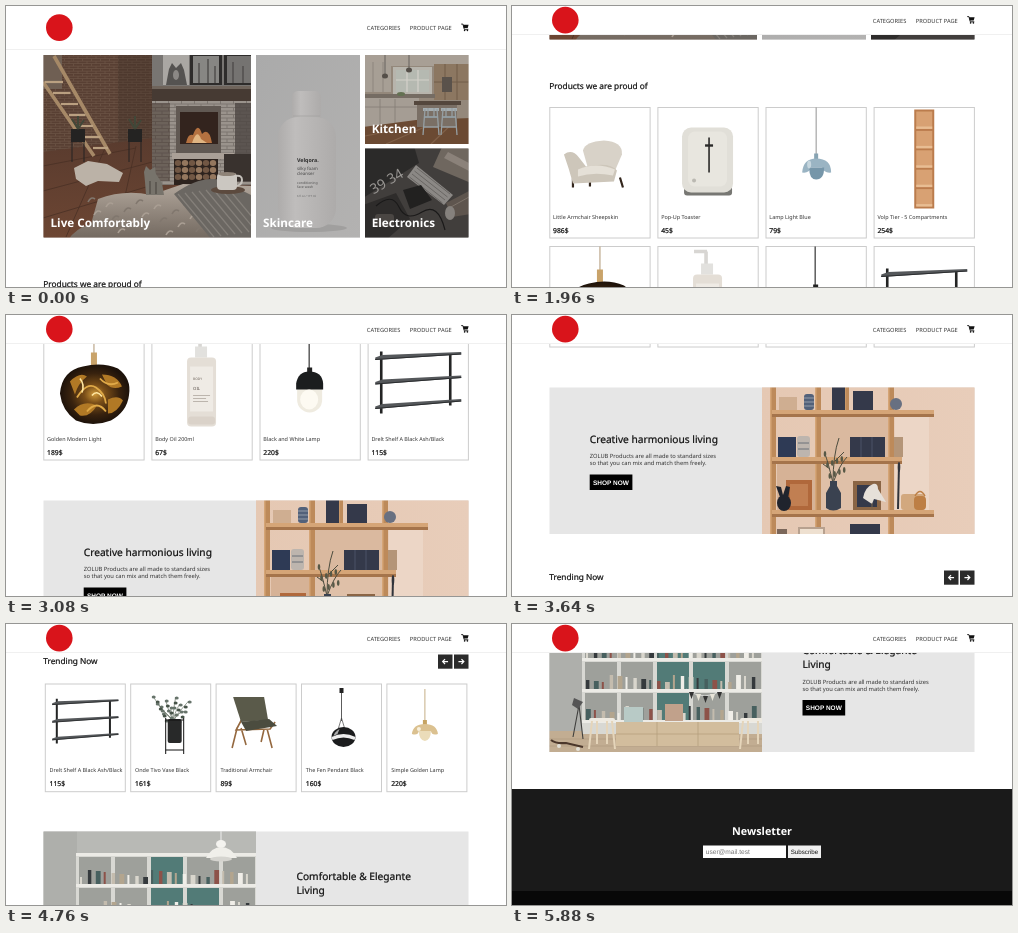
Write an HTML page that moves like this. It is 500 px wide and 281 px high and loops after 6020 ms.

```html
<!DOCTYPE html>
<html lang="en">
<head>
<meta charset="utf-8">
<title>Shop page scroll</title>
<style>
  html, body { margin: 0; width: 100%; height: 100%; overflow: hidden; background: #fff; }
  svg { display: block; }
  #stage { width: 100vw; height: 100vh; }
  text { font-family: "Noto Sans", "Open Sans", sans-serif; text-rendering: geometricPrecision; white-space: pre; }
  .ui { font-family: "Liberation Sans", Arial, sans-serif; }
  .medium { stroke: currentColor; stroke-width: .22; }
</style>
</head>
<body>
<svg id="stage" viewBox="0 0 500 281" preserveAspectRatio="none">
  <defs>
    <pattern id="brick" width="9" height="5" patternUnits="userSpaceOnUse">
      <rect width="9" height="5" fill="#6b5344"/>
      <path d="M.4 .4h8.2v1.8h-8.2zM-4.1 2.9h8.2v1.8h-8.2zM4.9 2.9h8.2v1.8h-8.2z" fill="#583f33"/>
    </pattern>
    <pattern id="stone" width="13" height="7" patternUnits="userSpaceOnUse">
      <rect width="13" height="7" fill="#7c756f"/>
      <path d="M.5 .5h12v2.5h-12zM-6 4h12v2.5h-12zM7 4h12v2.5h-12z" fill="#9a938c"/>
    </pattern>
    <linearGradient id="floor" x2="0" y2="1"><stop stop-color="#593b2e"/><stop offset="1" stop-color="#6d4633"/></linearGradient>
    <linearGradient id="fur" x2="0" y2="1"><stop stop-color="#b1a69b"/><stop offset="1" stop-color="#71675e"/></linearGradient>
    <linearGradient id="backdrop" x2="1" y2="1"><stop stop-color="#aaa"/><stop offset="1" stop-color="#b3b2b1"/></linearGradient>
    <linearGradient id="bottle"><stop stop-color="#aeacab"/><stop offset=".3" stop-color="#bfbdbc"/><stop offset="1" stop-color="#adabaa"/></linearGradient>
    <linearGradient id="plaster"><stop stop-color="#e5c8b3"/><stop offset="1" stop-color="#e8cdba"/></linearGradient>
    <radialGradient id="gold"><stop stop-color="#d09a3a"/><stop offset=".3" stop-color="#7a4e18"/><stop offset=".7" stop-color="#38220e"/><stop offset="1" stop-color="#1d120a"/></radialGradient>
    <filter id="soft"><feGaussianBlur stdDeviation=".55"/></filter>
  </defs>
  <g id="page"></g>
  <g id="header"></g>
</svg>
<script>
const rect = (x, y, w, h, fill, more = '') => `<rect x="${x}" y="${y}" width="${w}" height="${h}" fill="${fill}" ${more}/>`;
const oval = (x, y, rx, ry, fill) => `<ellipse cx="${x}" cy="${y}" rx="${rx}" ry="${ry}" fill="${fill}"/>`;
const shape = (d, fill) => `<path d="${d}" fill="${fill}"/>`;
const line = (d, stroke, width = 1) => `<path d="${d}" fill="none" stroke="${stroke}" stroke-width="${width}"/>`;
const text = (x, y, size, str, fill = '#111', more = '') =>
  `<text x="${x}" y="${y}" font-size="${size}" fill="${fill}" ${more}>${str}</text>`;
const shift = (x, y, body) => `<g transform="translate(${x} ${y})">${body}</g>`;
const photo = (x, y, w, h, base, body) =>
  `<svg x="${x}" y="${y}" width="${w}" height="${h}" viewBox="${x} ${y} ${w} ${h}">` +
  rect(x, y, w, h, base) + `<g filter="url(#soft)">${body}</g></svg>`;
const repeat = (n, fn) => Array.from({ length: n }, (_, i) => fn(i)).join('');
const medium = 'class="medium" color="#111"';
const bold = 'font-weight="700"';

// Hero photos
const livingRoom = photo(37.5, 49, 207.5, 182.5, '#5c453a',
  rect(36, 47, 110, 107, 'url(#brick)') +
  rect(36, 47, 20, 36, '#6f5f53') + rect(112, 47, 34, 90, '#3d2e27', 'opacity=".35"') +
  rect(146, 47, 101, 36, '#787572') +
  shape('M36 146L146 132L180 176V234H36Z', 'url(#floor)') +
  line('M37 160L130 142M37 185L150 155M37 212L160 175M60 231L100 140M110 231L130 140', '#4a3025', .8) +
  line('M48 50L104 148M37 76L88 150', '#a68967', 3.6) +
  repeat(7, i => line(`M${39 + i * 8} ${76 + i * 11}h${18 - i * .5}`, '#baa081', 2.2)) +
  rect(157, 47, 26, 32, '#aaa7a3') + shape('M160 79L163 63L166 57L170 62L175 57L178 64L181 79Z', '#555351') +
  oval(170, 69, 3, 5, '#8b8885') +
  rect(184, 47, 32, 32, '#2e2c2b') + rect(187, 50, 26, 27, '#878683') +
  rect(218, 47, 29, 32, '#2e2c2b') + rect(221, 50, 26, 27, '#757371') +
  line('M193 77V57M202 77V53M209 77V60M227 77V56M237 77V60', '#514f4d', 1.5) +
  rect(146, 80, 101, 17, '#463a33') + rect(146, 80, 101, 3, '#6f645b') +
  rect(146, 95, 101, 84, 'url(#stone)') + rect(146, 97, 18, 78, '#40322b', 'opacity=".5"') +
  rect(170, 100, 45, 47, '#615953') + rect(174, 106, 38, 32, '#33241e') +
  shape('M180 137Q182 127 187 129Q192 115 196 128Q203 121 206 137Z', '#b47140') +
  shape('M186 137Q191 122 195 133L201 137Z', '#e0b582') +
  rect(166, 147, 62, 6, '#aaa097') + rect(168, 153, 44, 26, '#2d231e') +
  repeat(18, i => oval(172 + i % 6 * 7, 157 + (i / 6 | 0) * 7, 3.2, 3, i % 2 ? '#94775e' : '#715744')) +
  rect(229, 97, 18, 79, '#4d4743', 'opacity=".8"') +
  rect(218, 148, 29, 27, '#39322e') +
  shape('M68 162L82 155L101 158L117 167L113 176L92 175L80 180L70 173Z', '#bbb2a7') +
  [72, 129].map(x => rect(x - 7, 123, 14, 13, '#242322') + line(`M${x - 6} 134v22M${x + 6} 134v22`, '#242322', 1) +
    line(`M${x} 123l-6 -10M${x} 123v-13M${x} 123l6 -9`, '#414738', 2)).join('') +
  shape('M92 193Q118 183 145 189L177 178L247 180V234H62Q70 222 85 218Z', 'url(#fur)') +
  repeat(26, i => line(`M${82 + i * 6} ${196 + i * 13 % 34}q3 -6 7 -3`, i % 2 ? '#a99e93' : '#81776e', 1.6)) +
  shape('M168 188Q194 169 215 174L247 190V234H206Z', '#6b6762') +
  repeat(8, i => line(`M${172 + i * 7} ${188 - i}l36 43`, '#85807a', 1.2)) +
  shape('M138 166l2 -6l4 4l5 -3l1 7l6 9l2 12h-18l-1 -13z', '#77736b') +
  line('M144 175v13M150 176v12', '#4f4a44', 1.2) +
  oval(222, 184, 17, 4, '#5c4a3e') +
  line('M230 170q6 -1 6 4q0 5 -6 6', '#c5c1bb', 2) +
  rect(211, 167, 20, 17, '#cbc7c1', 'rx="4"') + oval(221, 168, 9, 2, '#8e8378'));

const skincare = photo(250, 49, 104, 182.5, '#afaeae',
  rect(248, 47, 108, 187, 'url(#backdrop)') +
  oval(303, 222, 38, 4, '#a09f9e') +
  rect(286, 85, 29, 34, 'url(#bottle)', 'rx="6"') + line('M287 110h27', '#a4a2a1', .8) +
  rect(272, 111, 58, 111, 'url(#bottle)', 'rx="20"')) +
  text(291, 156, 5.3, 'Velqora.', '#2d2d2d', bold) +
  text(291, 164, 4.4, 'silky foam', '#454545') + text(291, 169, 4.4, 'cleanser', '#454545') +
  text(291, 177.5, 3.5, 'conditioning', '#555') + text(291, 181.8, 3.5, 'face wash', '#555') +
  text(291, 191, 2.8, '6 fl oz / 177 ml', '#666');

const stool = x => rect(x - 8, 102, 16, 3, '#a5adb0') + rect(x - 7, 110, 14, 2, '#8f999d') +
  line(`M${x - 6} 103l-2 26M${x + 6} 103l2 26M${x - 7} 121h14M${x - 3} 102v9M${x + 3} 102v9`, '#969fa3', 1.3);

const kitchen = photo(359, 49, 103.5, 89, '#94887b',
  rect(357, 47, 108, 94, '#94887b') + rect(357, 47, 108, 13, '#a89f95') +
  rect(357, 56, 28, 30, '#a79f95') + line('M367 56v30M377 56v30', '#857d74', .7) +
  rect(387, 61, 39, 27, '#b7b4ac') + rect(390, 64, 33, 22, '#b5b9b1') +
  line('M401 64v22M412 64v22M390 74h33', '#d4d1ca', 1.2) +
  rect(428, 58, 37, 36, '#8c7761') + line('M439 58v36M451 58v36M428 76h37', '#705c48', 1) +
  rect(436, 71, 10, 15, '#5a524b') +
  rect(357, 88, 72, 4, '#756c63') + rect(357, 92, 56, 29, '#a59d94') +
  line('M359 101h52M374 93v27M389 93v27', '#857d75', .8) +
  shape('M357 121L410 114L465 112V141H357Z', '#6b4a33') + line('M359 130L410 120M380 138L430 116M425 138L450 114', '#806048', 1.2) +
  rect(408, 95, 47, 4, '#54473d') + rect(411, 99, 40, 22, '#7a6f65') +
  line('M379 49v20M403 49v14', '#4d4946', .7) + oval(379, 70, 3, 2.5, '#554f49') + oval(403, 64, 3, 2.5, '#554f49') +
  oval(395, 88, 4, 2, '#637152') + stool(425) + stool(443));

const electronics = photo(359, 142.5, 103.5, 89, '#3c3a38',
  rect(357, 140, 108, 94, '#413e3c') +
  shape('M357 140H408L413 157L357 192Z', '#2b2a29') +
  `<g transform="rotate(-30 380 172)">${text(361, 180, 14, '39 34', '#9a9794', 'font-weight="300"')}</g>` +
  shape('M436 141H465V177L427 161Z', '#6f675f') + shape('M442 146L463 157V165L438 152Z', '#8b827a') +
  shape('M410 159L447 189L438 199L401 171Z', '#8b8885') +
  repeat(4, i => line(`M${411 - i * 2.5} ${162 + i * 3}l33 26`, '#6a6764', 1)) +
  shape('M397 184L415 179L426 194L404 203Z', '#222120') +
  shape('M440 197L465 184V208L446 211Z', '#5e554e') + line('M445 201L463 191', '#7d736a', 1) +
  oval(444, 207, 5, 7, '#85817d') + shape('M357 199L390 187L404 213L380 234H357Z', '#2e2c2b') +
  line('M370 200q16 -14 23 1t23 5t23 18', '#1a1919', 1.2) + rect(369, 208, 19, 13, '#4a4643', 'rx="3"'));

const hero = livingRoom + skincare + kitchen + electronics +
  [[44.5, 221, 'Live Comfortably'], [257, 221, 'Skincare'], [365.7, 127, 'Kitchen'], [365.7, 221, 'Electronics']]
    .map(([x, y, s]) => text(x, y, 11.7, s, '#fff', bold)).join('');

// Product pictures, each relative to the centre top of its card
const armchair = line('M-27 71v9M-10 73v6M20 70l3 10M-20 71v4', '#33261d', 2.2) +
  shape('M-17 43Q-15 34 4 33Q23 34 22 47L13 68H-10Z', '#d8d2c8') +
  shape('M-36 47Q-28 41 -21 50L-14 59Q10 54 17 63L14 74L-27 76Q-31 61 -36 47Z', '#cdc6ba') +
  shape('M-22 62Q-4 54 15 62L13 68Q-6 64 -22 69Z', '#e5e0d7');
const toaster = rect(-24, 79, 48, 9, '#777773', 'rx="3"') + rect(-26, 20, 51, 65, '#e1dfd8', 'rx="9"') +
  rect(-20, 24, 39, 55, '#e8e6df', 'rx="7"') + line('M1 30v35', '#2a2a29', 1.6) + line('M-3 38h8', '#2a2a29', 2.4) +
  oval(-14, 73, 2, 2, '#bbb9b2');
const blueLamp = line('M0 0v48', '#777', .8) + rect(-2, 46, 4, 6, '#88a4b3') +
  shape('M-14 65Q-13 51 0 51Q15 51 15 65Q8 66 6 60H-5Q-7 66 -14 65Z', '#9ab4c3') +
  shape('M-7 60H8Q8 72 0 72Q-7 72 -7 60Z', '#7696a9') + oval(-7, 57, 2, 4, '#c6d6de');
const tallRack = rect(-10, 2, 20, 99, '#bb7c4d') + repeat(5, i => rect(-8, 4 + i * 19.4, 16, 17.4, '#d8a173') +
  rect(-8, 19 + i * 19.4, 16, 2.4, '#e8bd93'));
const goldLight = line('M0 0v37', '#bca78a', 1.2) + rect(-3, 23, 6, 14, '#c9a36a') +
  shape('M-34 64Q-32 41 -11 37Q8 32 24 39Q38 49 35 66Q33 82 17 91Q-1 98 -18 91Q-32 81 -34 64Z', 'url(#gold)') +
  shape('M-24 52Q-14 42 -7 47Q-16 54 -19 65ZM8 45Q23 45 28 57Q19 61 13 55ZM-20 80Q-10 70 3 76Q-4 88 -14 86ZM14 70Q24 65 29 71Q23 84 14 84Z', '#b17925') +
  line('M-17 68Q-7 52 2 58T12 74M-7 82Q3 70 12 82M6 49Q14 58 24 53', '#e0aa48', 1.8) +
  line('M-14 49Q-9 55 -12 63M-2 66Q3 60 8 67', '#ffe7a2', 1.6);
const bodyOil = line('M-14 5h13M-2 5v15', '#d8d6d3', 3.6) + rect(-7, 17, 12, 11, '#e2e1de') +
  rect(-15, 28, 29, 69, '#e4ded6', 'rx="4"') + rect(-12, 37, 23, 45, '#efebe5') +
  text(-9, 50, 3.3, 'BODY', '#6c6259') + text(-9, 60, 4.3, 'OIL', '#554c45') +
  line('M-9 66h17M-9 69h13M-9 72h15', '#a79e95', .7) + rect(-14, 87, 27, 8, '#dad2c9', 'rx="3"');
const bwLamp = line('M-1 0v42', '#222', 1.1) + rect(-3, 38, 5, 6, '#222') +
  rect(-13, 47, 25, 36, '#efebe0', 'rx="12.5"') + shape('M-14 60V54Q-12 42 -1 42Q12 42 13 54V60Z', '#1b1d1e') +
  oval(-1, 70, 9, 10, '#fdfaf2');
const shelf = line('M-37 22v62M32 24v52', '#232424', 2.6) +
  repeat(3, i => shape(`M-43 ${28 + i * 24.5}L-36 ${25.5 + i * 24.5}L43 ${22.5 + i * 23.5}V${25 + i * 23.5}L-43 ${30.5 + i * 24.5}Z`, '#55585b') +
    line(`M-43 ${30 + i * 24.5}L43 ${24.5 + i * 23.5}`, '#2b2d2f', 1.2));
const vase = repeat(9, i => {
  const x = Math.round((i - 4) * 4.6), y = 12 + i * 7 % 17;
  return line(`M3 37Q${x / 3} 30 ${x} ${y}`, '#6c7769', .7) +
    repeat(3, j => oval(x * (1 - j * .22) + 1, y + 1 + j * 5, 2, 1.5, j % 2 ? '#465348' : '#66736a'));
}) + rect(-3, 35, 14, 24, '#282929', 'rx="2"') + line('M-5 34v36M13 34v36M-5 36h18M-5 66h18', '#111', 1);
const woodChair = line('M-19 44L-24 64M11 45L16 64M-12 31L-20 46L14 45L19 38M-15 44L-10 61M8 45L5 58', '#94683f', 1.6) +
  shape('M-23 13H8L12 36L-15 38Z', '#5a5a4a') + shape('M-15 38L13 35L21 42L-10 47Z', '#4b4c3f');
const domePendant = line('M0 5v32', '#333', .8) + rect(-2, 4, 4, 5, '#222') + line('M0 34l-3 10M0 34l3 10', '#444', .7) +
  oval(2, 53, 12, 10, '#1b1c1d') + shape('M-10 53Q2 47 14 53L13 56Q2 51 -9 56Z', '#eee') +
  shape('M-2 45Q-7 48 -8 52L-4 50Z', '#aaa');
const goldLamp = line('M-2 5v33', '#b69a67', .8) + rect(-4, 36, 4, 6, '#c6a361') +
  shape('M-15 50Q-14 40 -2 40Q10 40 11 50Q5 52 4 47H-8Q-9 52 -15 50Z', '#dbc190') +
  shape('M-8 47H4Q4 56 -2 57Q-8 56 -8 47Z', '#ebdcb9') + oval(-8, 45, 2, 2, '#f8f0dc');

const card = (x, y, w, h, [name, price, art], pad) => shift(x, y,
  rect(0, 0, w, h, '#fff', 'stroke="#ccc"') + shift(w / 2, 0, art) +
  text(pad, h - 19.5, 5.44, name, '#333') + text(pad, h - 5.5, 6.8, price + '$', '#111', medium));

const products = [
  ['Little Armchair Sheepskin', 986, armchair], ['Pop-Up Toaster', 45, toaster],
  ['Lamp Light Blue', 79, blueLamp], ['Volp Tier - 5 Compartments', 254, tallRack],
  ['Golden Modern Light', 189, goldLight], ['Body Oil 200ml', 67, bodyOil],
  ['Black and White Lamp', 220, bwLamp], ['Drelt Shelf A Black Ash/Black', 115, shelf]
];
const trending = [
  ['Drelt Shelf A Black Ash/Black', 115, shift(0, -1, `<g transform="scale(.77 .72)">${shelf}</g>`)],
  ['Onde Tivo Vase Black', 161, vase], ['Traditional Armchair', 89, woodChair],
  ['The Fen Pendant Black', 160, domePendant], ['Simple Golden Lamp', 220, goldLamp]
];

// Banners
const wood = '#bd8a5a', navy = '#34394a';
const wallShelf = photo(250, 72.5, 212.5, 146.5, '#e6cab6',
  rect(248, 70, 217, 151, 'url(#plaster)') +
  rect(309, 102, 67, 40, '#dab99f') + rect(265, 148, 38, 47, '#d6b296') + rect(309, 148, 67, 47, '#dfc0a8') +
  rect(383, 102, 34, 93, '#ecd6c6') +
  [258, 303, 332, 376].map(x => rect(x, 70, x === 332 ? 5 : 6, x === 332 ? 26 : 151, wood) +
    rect(x, 70, 1.5, x === 332 ? 26 : 151, '#d5a577')).join('') +
  [[260, 95, 162], [260, 142, 130], [260, 195, 162]].map(([x, y, w]) =>
    rect(x, y, w, 4, '#d5a577') + rect(x, y + 4, w, 3, '#a5744b')).join('') +
  rect(292, 79, 10, 16, '#52617a', 'rx="3"') + line('M292 83h10M292 87h10M292 91h10', '#a4abb5', .8) +
  rect(267, 82, 18, 13, '#cfae91') +
  rect(320, 71, 13, 24, navy) + rect(341, 76, 20, 19, navy) + oval(384, 89, 6, 6, '#687081') +
  rect(266, 122, 18, 20, '#2e3a55') + rect(285, 121, 13, 21, '#bdb5ae', 'rx="3"') + line('M286 128h11M286 134h11', '#6b7078') +
  rect(338, 122, 35, 20, navy) + line('M349 122v20M360 122v20', '#4b5266') + rect(382, 122, 9, 20, '#b49578') +
  rect(274, 165, 26, 30, '#b0683b') + rect(278, 169, 18, 22, '#c17f52') +
  oval(272, 188, 7, 8, '#20242d') + shape('M268 182L264 171L269 172L271 180L274 171L278 172L276 184Z', '#20242d') +
  line('M321 168Q316 147 313 139M321 168Q321 140 327 123M321 168Q328 149 335 142M318 154l-7 -5M323 146l9 -9', '#4c4c3e', 1) +
  repeat(9, i => oval(313 + i * 2.4, 139 + i * 11 % 24, 1.3, 3, '#575846')) +
  shape('M318 166H325V171L329 178V193Q321 198 314 193V178L318 171Z', '#3a4250') +
  rect(341, 166, 28, 29, '#8a6545') + rect(345, 170, 20, 22, navy) +
  shape('M351 183Q353 172 361 169Q366 168 366 174L374 187L362 184L360 189Z', '#e6e0d9') + line('M360 188v7', '#79664f', 1) +
  line('M386 194L387 150', '#31343b', 2) + oval(387, 152, 1.3, 5, '#31343b') +
  rect(389, 179, 24, 16, '#d2a87e', 'rx="3"') + rect(402, 181, 12, 14, '#bd7f45', 'rx="4"') + line('M403 181q5 -9 10 0', '#bd7f45', 1.5) +
  rect(286, 212, 27, 9, '#b7a18f') + rect(288, 214, 23, 7, '#eee0d0') + rect(338, 209, 30, 12, navy) + rect(265, 214, 10, 7, '#7b675a'));

const bookColors = ['#d9d6cd', '#8d5249', '#f0eee8', '#47605f', '#b3a58e', '#353a3d', '#c4bcae'];
const bookcase = photo(37.5, 207.5, 212.5, 146.5, '#b8b9b5',
  rect(36, 205, 217, 151, '#b8b9b5') + rect(36, 205, 35, 132, '#aeafab') +
  rect(36, 333, 217, 24, '#c2ad92') + line('M37 341h213M37 348h213', '#ac987e', .7) +
  rect(70, 229, 183, 107, '#d8d8d3') +
  repeat(15, i => rect(73 + i % 5 * 36, 233 + (i / 5 | 0) * 31, 32, 28, i % 5 === 2 || i === 8 ? '#527b77' : '#9ea09b')) +
  repeat(66, i => {
    const row = i / 22 | 0, n = i % 22, h = 8 + i * 7 % 8;
    return rect(74 + n * 7.9, 261 + row * 31 - h, 2 + i % 3 * 1.4, h, bookColors[i * 5 % 7]);
  }) +
  repeat(4, i => rect(70, 229 + i * 31, 183, 3, '#ecebe6')) +
  rect(104, 324, 123, 24, '#d2bd9d') + line('M145 324v24M186 324v24M104 336h123', '#b39b79', .7) +
  rect(112, 309, 19, 15, '#b8cac6') + rect(153, 306, 18, 17, '#c1a18b') +
  line('M174 291Q193 305 211 291', '#eee', .7) +
  repeat(5, i => shape(`M${177 + i * 7} ${294 + (2 - Math.abs(i - 2)) * 2}h5l-2.5 7z`, i % 2 ? '#e8e4d8' : '#333')) +
  [90, 241].map(x => rect(x - 13, 320, 26, 4, '#eeeae1', 'rx="2"') +
    line(`M${x - 10} 323l-3 28M${x + 10} 323l3 28M${x - 5} 323v23M${x + 5} 323v23`, '#e5d5ba', 2)).join('') +
  line('M39 342q5 4 15 3l17 4', '#4b372b', 2.2) + oval(47, 348, 2, 2, '#e2dfd6') + oval(66, 351, 2, 2, '#e2dfd6') +
  line('M61 339l6 -32M67 307l4 34', '#3f3f3d', 1.1) + shape('M62 300l9 4l-5 7l-6 -4z', '#555') +
  line('M215 207v12', '#eee', 1) + oval(215, 220, 5, 4, '#f4f3ef') + shape('M200 234Q206 223 215 223Q225 223 231 234Z', '#f0efea') +
  oval(215, 235, 11, 2.5, '#d5d4cf'));

const pitch = (x, y, titles) => titles.map((s, i) => text(x, y + i * 14.7, 10.2, s, '#111', medium)).join('') +
  shift(x, y + (titles.length - 1) * 14.7,
    text(0, 15.3, 5.77, 'ZOLUB Products are all made to standard sizes', '#333') +
    text(0, 22.7, 5.77, 'so that you can mix and match them freely.', '#333') +
    rect(0, 31.7, 42.7, 15.5, '#000') +
    text(21.3, 41.9, 6.5, 'SHOP NOW', '#fff', 'class="ui" font-weight="700" text-anchor="middle"'));

const arrow = (x, dir) => rect(x, 792.5, 14.5, 14.2, '#2b2b2b') +
  `<g transform="translate(${x + 7.25} 799.6) scale(${dir} 1)">${line('M-2.8 0H2.6M.2 -2.4L2.6 0L.2 2.4', '#fff', 1.2)}</g>`;

const footer = rect(0, 1153, 500, 103, '#1a1a1a') + rect(0, 1255, 500, 60, '#080808') +
  text(250, 1199, 10.8, 'Newsletter', '#fff', bold + ' text-anchor="middle"') +
  rect(191, 1209.5, 83, 12.5, '#fff') + text(193.8, 1218.1, 6.6, 'user@mail.test', '#757575', 'class="ui"') +
  rect(276, 1209.5, 33, 12.5, '#efefef') + text(292.5, 1218.1, 6.2, 'Subscribe', '#111', 'class="ui" text-anchor="middle"');

const page = document.getElementById('page');
const header = document.getElementById('header');

page.innerHTML = hero +
  text(37.3, 281.3, 8.3, 'Products we are proud of', '#111', medium) +
  products.map((p, i) => card(37.8 + i % 4 * 108.1, i < 4 ? 299.5 : 438.5, 100.3, 130.5, p, 3.3)).join('') +
  rect(37.5, 609.5, 425, 146.5, '#e6e6e6') + shift(0, 537, wallShelf) +
  pitch(77.7, 664.8, ['Creative harmonious living']) +
  text(37.3, 802, 8.25, 'Trending Now', '#111', medium) + arrow(432, -1) + arrow(448, 1) +
  trending.map((p, i) => card(39.3 + i * 85.4, 822, 80, 107.7, p, 4.3)).join('') +
  rect(37.5, 969.5, 425, 146.5, '#e6e6e6') + shift(0, 762, bookcase) +
  pitch(290.5, 1017.6, ['Comfortable &amp; Elegante', 'Living']) + footer;

header.innerHTML = rect(0, -50, 500, 50, '#fff') + line('M0 -.5H500', '#f0f0f0') +
  '<g id="nav">' + oval(53.3, -.4, 13.3, 13.3, '#d9141b') +
  text(360.8, 2.4, 5.7, 'CATEGORIES', '#333') + text(403.8, 2.4, 5.7, 'PRODUCT PAGE', '#333') +
  line('M455.2 -3.9h1.7l1.4 5.2h4', '#111', .9) + shape('M457 -3.3h5.6l-.9 3.4h-3.9z', '#111') +
  oval(458.6, 2.4, .8, .8, '#111') + oval(461.4, 2.4, .8, .8, '#111') + '</g>';
const nav = document.getElementById('nav');

// The page rests, then scrolls in steps of 140 ms while the header shrinks.
function draw() {
  const step = Math.max(0, Math.floor(performance.now() % 6020 / 140) - 7);
  const scroll = Math.max(0, Math.round(Math.min(28.7 * step - 2.7, 28.2 * step + 1)));
  const height = Math.max(29, 44 - 3 * step * step);
  page.setAttribute('transform', `translate(0 ${-scroll})`);
  header.setAttribute('transform', `translate(0 ${height})`);
  nav.setAttribute('transform', `translate(0 ${-height / 2})`);
  requestAnimationFrame(draw);
}
draw();
</script>
</body>
</html>
```
